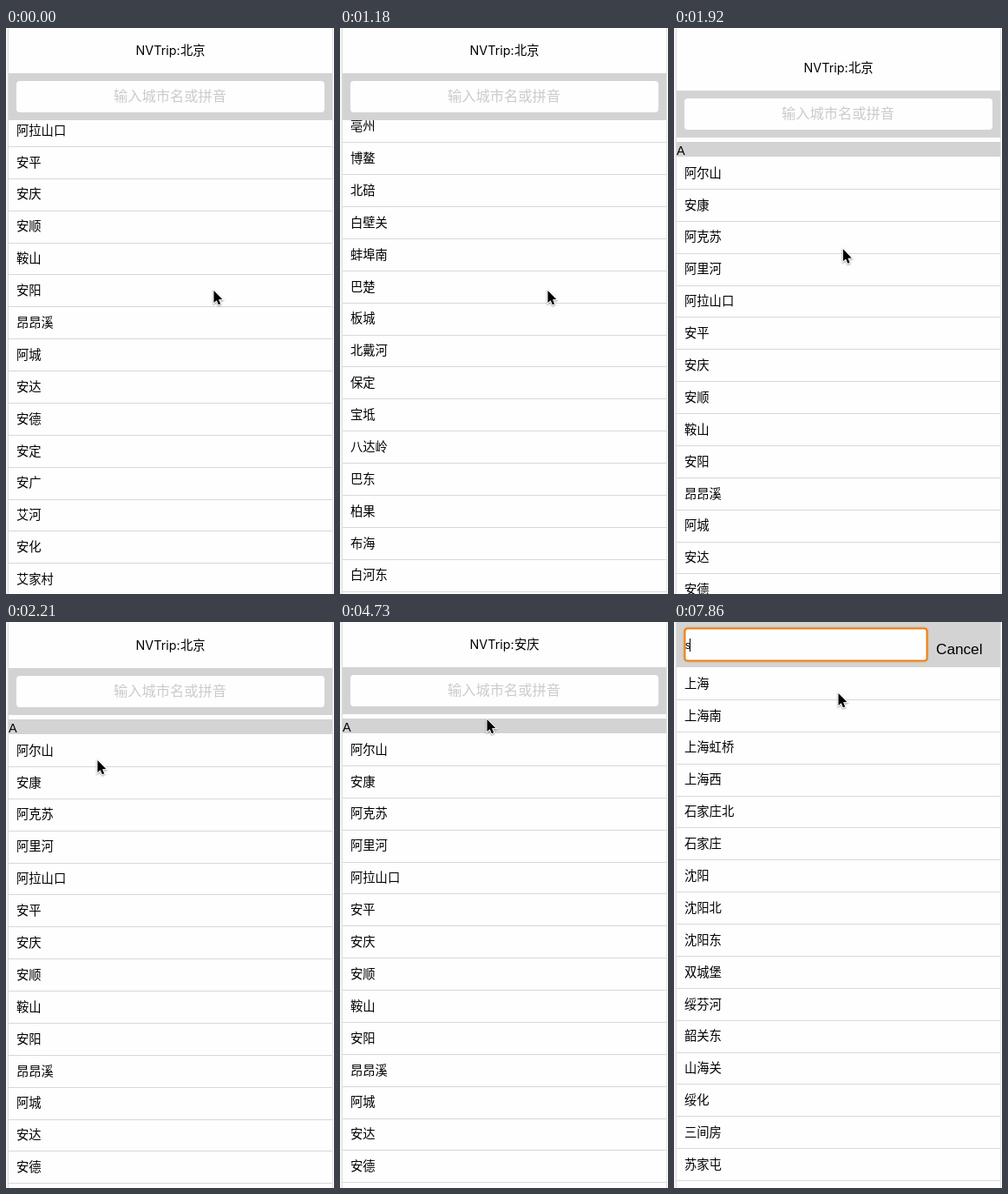
Recreate the animation shown at these times as an HTML page with a canvas. Size 378 by 651 pixels, loop 8000 ms.

```html
<!DOCTYPE html>
<html lang="zh-CN">
<head>
<meta charset="utf-8">
<title>City picker</title>
<style>
  html, body { margin: 0; width: 100%; height: 100%; overflow: hidden; background: #fefefe; }
  canvas { display: block; }
</style>
</head>
<body>
<canvas id="stage" width="378" height="651"></canvas>
<script>
const ctx = document.getElementById('stage').getContext('2d');
const W = 378, H = 651, LOOP = 8000;
const LEFT = 3, RIGHT = 376, ROW = 36.88, BAR = 18, LIST_TOP = 128;
const PAPER = '#fefefe', GREY = '#d3d3d3', LINE = '#d8d8d8';
const CJK = '"Noto Sans CJK SC", "Noto Sans CJK", sans-serif';
const SANS = '"Liberation Sans", Arial, sans-serif';

const sections = [
  ['A', '阿尔山 安康 阿克苏 阿里河 阿拉山口 安平 安庆 安顺 鞍山 安阳 昂昂溪 阿城 安达 安德 安定 安广 艾河 安化 艾家村 鳌江 安家 阿金 阿克陶 安口窑 敖力布告 安龙 阿龙山 安陆 阿木尔 阿南庄 安庆西 鞍山西 安塘 安亭北 阿图什 安图 安溪'],
  ['B', '北安 蚌埠 白城 北海 白河 白涧 宝鸡 滨江 博克图 百色 白山市 北台 包头东 包头 北屯市 本溪 白云鄂博 白银西 亳州 博鳌 北碚 白壁关 蚌埠南 巴楚 板城 北戴河 保定 宝坻 八达岭 巴东 柏果 布海 白河东 宝华山 白河县 白芨沟 碧鸡关 北滘 碧江 白鸡坡 笔架山 八角台 保康 白奎堡 白狼 百浪 博乐']
].map(([letter, names]) => ({ letter, names: names.split(' ') }));
const results = '上海 上海南 上海虹桥 上海西 石家庄北 石家庄 沈阳 沈阳北 沈阳东 双城堡 绥芬河 韶关东 山海关 绥化 三间房 苏家屯'.split(' ');

// Tracks: [tick, value...], linear between the keys.
const scrollTrack = [[0, 176.5], [1, 260], [2, 760], [3, 1480], [4, 2053.6], [5, 2240], [6, 2290],
  [7, 2290], [8, 2080], [9, 1250], [10, 190], [11, -107], [12, -60], [13, -20], [14, -5], [15, -1], [16, 0]];
const cursorTrack = [[0, 239.5, 302], [12, 239.5, 302], [15, 105.5, 159], [17, 105.5, 159],
  [19, 84.5, 90], [21, 150, 2], [23, 215, 90], [25, 225, 263], [27, 150, 372], [28, 116, 379],
  [29, 118, 368], [31, 150, 190], [32, 169.5, 112], [33, 180, 95], [34, 189.5, 82]];
const openTrack = [[34, 0], [35, 0.25], [36, 0.7], [37, 1]];
const PICKED = 29, FOCUSED = 38, TYPED = 52, FOUND = 53;

function sample(track, tick) {
  const next = track.findIndex(key => key[0] > tick);
  if (next < 0) return track[track.length - 1].slice(1);
  if (next === 0) return track[0].slice(1);
  const a = track[next - 1], b = track[next];
  const p = (tick - a[0]) / (b[0] - a[0]);
  return a.slice(1).map((v, i) => mix(v, b[i + 1], p));
}

function mix(a, b, p) { return a + (b - a) * p; }

function tickAt(time) {
  let n = 0;
  while (147.1 * (n + 1) + 0.023 * (n + 1) ** 2 - 4 <= time) n++;
  return n;
}

function rect(x, y, w, h, color) {
  ctx.fillStyle = color;
  ctx.fillRect(x, y, w, h);
}

function roundPath(x, y, w, h, r) {
  ctx.beginPath();
  ctx.roundRect(x, y, w, h, r);
}

function text(str, x, y, size, family, color = '#000', align = 'left') {
  ctx.font = `${size}px ${family}`;
  ctx.fillStyle = color;
  ctx.textAlign = align;
  ctx.fillText(str, x, y);
}

function drawRow(name, top) {
  if (top > H || top < -ROW) return;
  text(name, 12, top + 23.7, 14.3, CJK);
  rect(LEFT, Math.round(top + ROW), RIGHT - LEFT, 1, LINE);
}

function drawList(scroll) {
  let y = LIST_TOP - BAR + 1 - scroll;
  for (const { letter, names } of sections) {
    rect(LEFT, Math.round(y), RIGHT - LEFT, BAR - 1, GREY);
    text(letter, LEFT, y + 15, 14.5, SANS);
    y += BAR - 1;
    for (const name of names) {
      drawRow(name, y);
      y += ROW;
    }
    y += 1;
  }
}

function drawTitle(shift, city) {
  rect(LEFT, 0, RIGHT - LEFT, 52 + shift, PAPER);
  text('NVTrip:', 200.5, 31 + shift, 14.3, 'Inter, sans-serif', '#000', 'right');
  text(city, 201, 31 + shift, 14.3, CJK);
}

function drawSearch(y, open, tick) {
  const barHeight = mix(54, 52, open);
  const box = { x: 12, y: y + mix(9, 7, open), w: mix(355, 280, open), h: mix(36, 38, open) };
  rect(LEFT, y, RIGHT - LEFT, barHeight, GREY);
  roundPath(box.x, box.y, box.w, box.h, 4);
  ctx.fillStyle = PAPER;
  ctx.fill();
  if (open > 0) {
    ctx.strokeStyle = 'rgba(235,150,50,0.55)';
    ctx.lineWidth = 3;
    ctx.stroke();
    roundPath(box.x + 0.5, box.y + 0.5, box.w - 1, box.h - 1, 3);
    ctx.strokeStyle = '#f0780f';
    ctx.lineWidth = 1.6;
    ctx.stroke();
  }
  if (tick < TYPED) {
    text('输入城市名或拼音', box.x + box.w / 2 - 0.5, y + mix(32, 31, open), 16.25, CJK, '#cbcbcb', 'center');
  }
  if (open === 1) text('Cancel', 302, y + 36.5, 17.2, SANS);
}

function drawCaret(tick) {
  const hidden = (tick >= 41 && tick < 44) || (tick >= 48 && tick < 51);
  if (tick < FOCUSED || hidden) return;
  if (tick >= TYPED) text('s', 13, 31, 12, SANS);
  rect(tick >= TYPED ? 18 : 13, 19, 1, 15, '#000');
}

function drawCursor(x, y) {
  ctx.save();
  ctx.translate(x, y);
  ctx.beginPath();
  [[0, 0], [0, 14], [3.2, 11.2], [5.4, 16.3], [7.7, 15.3], [5.5, 10.3], [9.8, 10.1]]
    .forEach(([px, py]) => ctx.lineTo(px, py));
  ctx.closePath();
  ctx.shadowColor = 'rgba(0,0,0,0.4)';
  ctx.shadowBlur = 2;
  ctx.shadowOffsetY = 1;
  ctx.strokeStyle = '#fff';
  ctx.lineWidth = 2;
  ctx.stroke();
  ctx.shadowColor = 'transparent';
  ctx.fillStyle = '#000';
  ctx.fill();
  ctx.restore();
}

function draw(time) {
  const tick = tickAt(time);
  const [scroll] = sample(scrollTrack, tick);
  const [open] = sample(openTrack, tick);
  const shift = Math.max(0, -scroll);

  rect(0, 0, W, H, PAPER);
  if (open === 0) {
    drawList(scroll);
    drawTitle(shift, tick < PICKED ? '北京' : '安庆');
  } else if (tick >= FOUND) {
    results.forEach((name, i) => drawRow(name, 52 + i * ROW));
  }
  drawSearch(mix(52 + shift, 0, open), open, tick);
  drawCaret(tick);

  rect(0, 0, 2, H, '#f6f6f6');
  rect(2, 0, 1, H, '#dcdcdc');
  rect(RIGHT, 0, 1, H, '#e2e2e2');
  drawCursor(...sample(cursorTrack, tick));
}

const start = performance.now();
function loop() {
  draw((performance.now() - start) % LOOP);
  requestAnimationFrame(loop);
}
loop();
</script>
</body>
</html>
```
